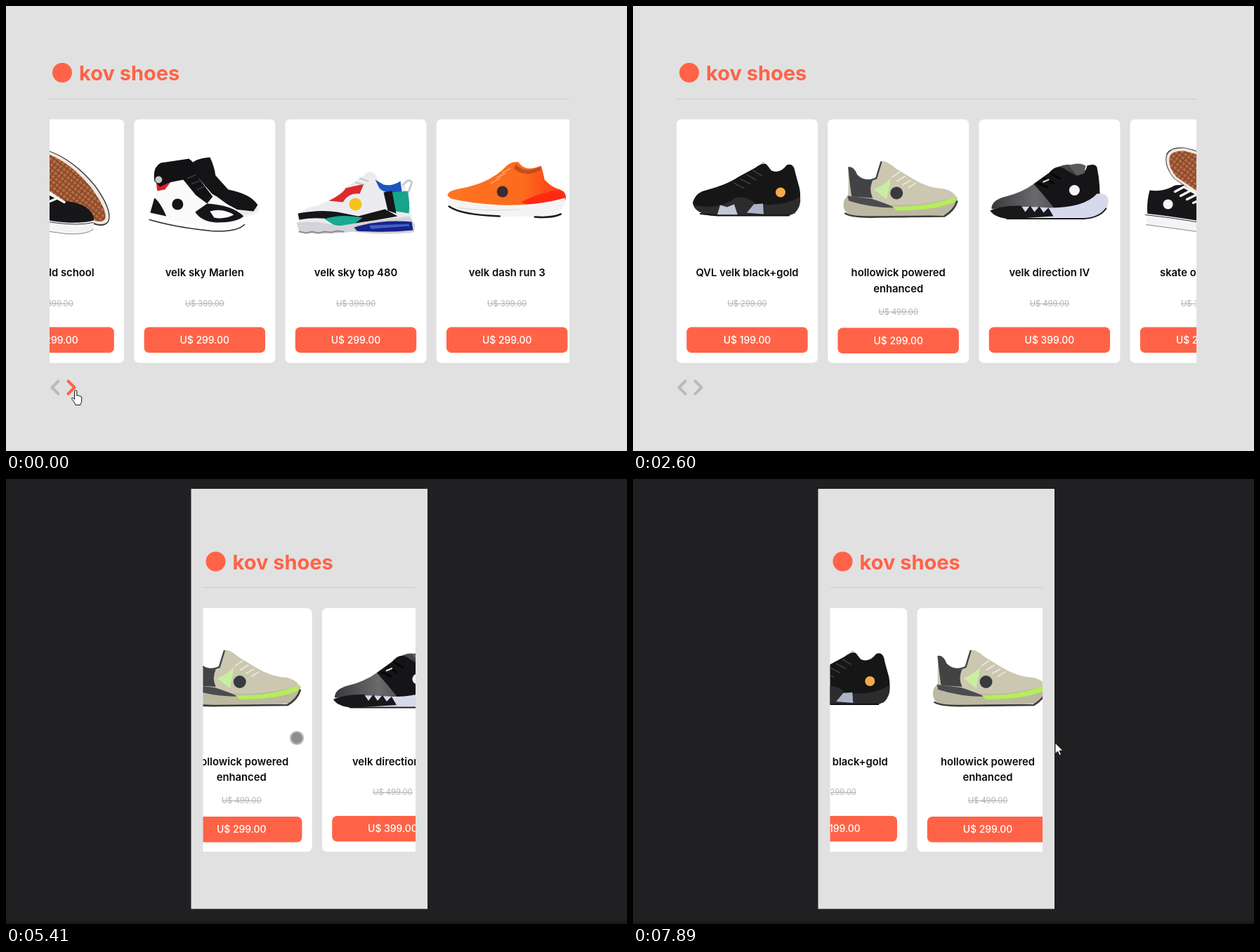
An HTML page that plays this animation: 884 px wide and 634 px high, repeating every 8000 ms.

```html
<!DOCTYPE html>
<html lang="en">
<head>
<meta charset="utf-8">
<title>kov shoes</title>
<style>
  html, body { margin: 0; width: 100%; height: 100%; overflow: hidden; background: #e1e1e1; }
  svg { display: block; width: 100vw; height: 100vh; font-family: Inter, "Open Sans", sans-serif; }
  .brand { font-size: 29px; font-weight: 700; fill: #ff6347; }
  .name { font-size: 14.8px; font-weight: 600; fill: #0b0b0b; text-anchor: middle; }
  .old { font-size: 11.2px; fill: #b4b4b4; text-anchor: middle; text-decoration: line-through; }
  .price { font-size: 13.9px; font-weight: 500; fill: #fff; text-anchor: middle; }
  .nav path { fill: none; stroke-width: 4; stroke-linecap: round; stroke-linejoin: round; }
</style>
</head>
<body>
<svg viewBox="0 0 884 634">
  <defs>
    <clipPath id="view"><rect id="viewBox" x="62" y="155" height="360"/></clipPath>
    <linearGradient id="mesh"><stop offset="0" stop-color="#3a3a3d"/><stop offset=".5" stop-color="#6a6a6d"/><stop offset="1" stop-color="#39393b"/></linearGradient>
    <linearGradient id="flame"><stop offset="0" stop-color="#ff7420"/><stop offset=".65" stop-color="#fb6a1e"/><stop offset="1" stop-color="#ff3214"/></linearGradient>
    <linearGradient id="teal" x2="0" y2="1"><stop offset="0" stop-color="#2a8e9b"/><stop offset="1" stop-color="#37a6b0"/></linearGradient>
    <pattern id="grip" width="6" height="6" patternUnits="userSpaceOnUse" patternTransform="rotate(38)">
      <rect width="6" height="6" fill="#8a4a2a"/><rect x="1" y="1" width="4" height="4" fill="#b56c45"/>
    </pattern>
  </defs>
  <rect width="884" height="634" fill="#e1e1e1"/>
  <g id="phone">
    <rect width="884" height="634" fill="#202022"/>
    <rect y="630" width="884" height="4" fill="#1b171a"/>
    <rect x="263.5" y="14" width="336.5" height="598.5" fill="#e1e1e1"/>
  </g>
  <g id="page">
    <circle cx="80" cy="95" r="14" fill="#ff6347"/>
    <text class="brand" x="104" y="106">kov shoes</text>
    <rect id="rule" x="62" y="131.5" height="1" fill="#cbcbcb" shape-rendering="crispEdges"/>
    <g clip-path="url(#view)"><g id="track"></g></g>
  </g>
  <g id="nav" class="nav">
    <path id="prev" d="M74.5 534.5L65.5 543.5L74.5 552.5"/>
    <path id="next" d="M88.5 534.5L97.5 543.5L88.5 552.5"/>
  </g>
  <path id="hand" fill="#fff" stroke="#111" stroke-linejoin="round"
    d="M4.5 13V2.3a1.7 1.7 0 0 1 3.4 0V8.5c.2-1.3 2.5-1.1 2.5.4c.3-1.1 2.3-.9 2.3.7c.4-.9 2-.5 2 1V15c0 3-1.5 4-1.8 6.5H6C5.6 18.5 1.6 15 .7 12.6c-.4-1.6 1.8-2 3.8.8Z"/>
  <path id="arrow" fill="#fff" stroke="#111" stroke-width=".8" d="M0 0V15.2L3.6 12L6 17.6L8.4 16.5L6 11.1H10.8Z"/>
  <circle id="touch" r="9" fill="#8d8d8d" stroke="#b9b9b9" stroke-width="2.2"/>
</svg>
<script>
const $ = id => document.getElementById(id);
const fill = (c, d) => `<path fill="${c}" d="${d}"/>`;
const line = (c, w, d) => `<path fill="none" stroke="${c}" stroke-width="${w}" stroke-linecap="round" stroke-linejoin="round" d="${d}"/>`;
const dot = (c, x, y, r) => `<circle fill="${c}" cx="${x}" cy="${y}" r="${r}"/>`;

const shoes = {
  gold:
    line('#aaa', 1.2, 'M119 68Q123 57 126 64') +
    fill('#161617', 'M23 119Q27 104 42 101Q72 93 88 82L112 69Q122 61 128 64L135 73Q147 78 157 65Q167 61 169 76L175 98Q179 118 169 132L160 136H48Q26 133 23 119Z') +
    fill('#2c2c2f', 'M24 122Q60 130 84 112Q100 108 112 120Q150 126 176 110Q178 124 168 134L160 137H48Q27 133 24 122Z') +
    fill('#c3c7d6', 'M62 122L72 125L82 121L87 136H58Z') + fill('#aeb4c8', 'M100 133L110 121L123 120L124 135Z') +
    line('#3d3d40', 1.6, 'M82 91l14 7M91 85l14 7M100 79l13 7M109 73l12 7') +
    line('#111', 2, 'M34 134.5L58 137H160') + dot('#f2ab4c', 148, 104, 7),
  lime:
    fill('#ccc7b0', 'M29 68Q37 66 42 79Q53 90 69 82L76 60Q82 57 97 70L120 84Q142 98 166 99Q184 104 184 117L172 132L28 130Q30 96 29 68Z') +
    fill('#414345', 'M29 68Q37 66 42 79Q52 89 64 87Q58 100 64 112L34 110Q31 90 29 68Z') +
    line('#414345', 2.4, 'M42 81Q54 91 69 84L76 61') +
    fill('#c8efa0', 'M66 100Q80 94 90 84L84 114Z') +
    fill('#bdb8a2', 'M29 108Q58 116 84 121Q130 126 184 110Q186 126 168 136L110 140L34 138Q18 130 24 114Z') +
    fill('#4a4c4d', 'M28 109L62 113Q84 120 96 126Q60 126 30 116Z') +
    fill('#b4ee59', 'M92 124Q140 126 183 110L181 118Q150 130 98 130Z') +
    line('#3b3d3d', 2.6, 'M25 134Q34 140 70 139L166 138Q180 130 184 117') +
    line('#ece8d8', 1.8, 'M92 82l10-7M99 88l11-7M107 93l11-6M115 97l10-6') + dot('#383b3e', 98, 105, 9),
  mesh:
    fill('url(#mesh)', 'M18 127Q18 115 38 110Q62 104 78 92L102 76Q116 62 132 65L142 68L140 128L30 136Z') +
    fill('#151517', 'M78 92L100 76Q112 62 124 72L138 80Q152 78 154 66Q165 62 168 68Q172 86 172 104L176 122L110 130L92 108Z') +
    fill('#5c5c5f', 'M128 66Q142 60 152 66L150 77L139 80Z') +
    fill('#d6d9ec', 'M17 128Q60 122 100 126Q150 126 168 106Q186 104 184 120Q180 136 164 140L40 140Q20 138 17 128Z') +
    fill('#18181a', 'M16 130Q34 122 60 123L66 132L73 123L79 132L86 124L92 133L99 126L106 138L44 142Q22 140 16 130Z') +
    line('#18181a', 2, 'M40 141.5H150Q172 140 181 127') +
    line('#050505', 3, 'M84 91l14 6M93 84l13 7M102 77l13 7') + line('#ddd', 2.4, 'M92 89l7-3') + dot('#f4f4f6', 136, 101, 7.5),
  skate:
    fill('#333', 'M51 54Q52 39 76 40Q122 48 160 94Q186 130 179 146Q170 158 146 144L62 84Q49 68 51 54Z') +
    fill('#f1e8e2', 'M52 54Q54 40 77 41Q121 49 159 95Q184 130 178 145Q170 155 148 143L63 84Q50 68 52 54Z') +
    fill('url(#grip)', 'M56 55Q58 44 77 45Q118 53 154 97Q178 130 174 142Q168 150 150 140L66 82Q54 68 56 55Z') +
    fill('#17171a', 'M25 138Q23 118 28 101Q46 104 64 94L76 93Q94 112 122 117Q152 121 158 140L157 152Z') +
    line('#f4f4f4', 3.4, 'M64 103l13-7M72 109l15-8M81 114l16-8M90 119l17-7M78 97l38 21') +
    fill('#f4f4f7', 'M22 134Q60 138 100 145Q136 150 158 144L157 158Q146 165 118 163L24 150Z') +
    line('#35353a', 1, 'M22 136Q60 140 100 147Q136 152 157 147') + line('#88888e', 1, 'M23 150L118 163Q146 165 157 157') +
    dot('#f4f4f4', 54, 121, 7),
  high:
    fill('#e9e9ec', 'M100 100L150 108Q178 118 177 132Q170 140 140 138L110 124Z') +
    fill('#141416', 'M80 66Q84 56 108 54Q114 66 116 80L134 100Q166 106 176 122L170 131L142 128L118 110L92 96Z') +
    line('#f4f4f6', 3, 'M134 139Q164 141 176 131') +
    fill('#fafafb', 'M29 86L31 115L23 130Q20 143 42 147L110 157Q150 159 157 146Q158 134 144 127L116 112L92 84Z') +
    fill('#d51f2a', 'M31 86L53 88L44 100L33 102Z') +
    fill('#121214', 'M29 88Q26 68 38 62L78 56Q92 66 92 84L112 110L104 120L88 108L70 86L50 90L37 96Z') +
    fill('#16161a', 'M104 120Q140 122 156 138Q146 147 118 147Q96 146 87 132Z') +
    fill('#16161a', 'M29 112Q36 116 46 138L23 133Z') + fill('#fbfbfc', 'M108 131Q126 126 142 136Q128 143 114 140Z') +
    line('#fff', 5, 'M24 139Q60 150 110 155Q146 157 156 147') + line('#2a2a2e', 1.6, 'M22 143Q60 154 110 159Q146 161 157 150') +
    line('#3a3a3e', 1.4, 'M76 84l12-5M82 92l13-5M90 100l12-5') + dot('#c8c8cc', 35, 86, 5) + dot('#141416', 62, 121, 8),
  multi:
    line('#c9c9cf', 3, 'M166 96Q176 82 180 90Q178 98 173 108') +
    fill('#ececf0', 'M17 140Q22 126 48 122Q74 112 90 94L112 80Q122 70 128 79L136 92Q152 97 170 94L176 120L182 148L90 156H24Z') +
    fill('#de2a2a', 'M62 116Q82 106 86 98L112 92L106 106Q90 104 82 118Z') +
    fill('#1c55c2', 'M128 86L140 93Q152 96 164 88L166 103Q142 108 134 98Z') +
    fill('#16a58a', 'M150 104L174 102Q178 118 176 134L152 130Z') + fill('#161619', 'M140 104L152 102L158 134L146 130Z') +
    fill('#161619', 'M18 134Q50 128 74 132L104 138L142 128L160 138L132 143L92 150Q56 136 20 143Z') +
    fill('#1aa890', 'M56 142Q78 134 110 140L94 153L70 151Z') +
    fill('#d3d3da', 'M16 147Q50 144 76 152L112 146L176 138L185 150L183 161Q140 166 96 160Q50 166 20 160Z') +
    fill('#17238c', 'M98 154Q136 142 180 146L182 158Q140 162 102 159Z') + fill('#4160c8', 'M120 151L176 149L177 152L122 156Z') +
    line('#8d8d95', 2, 'M20 160l10 2l8-2l9 2l9-2l9 1l9-2l9 1') + line('#bbb', 1.6, 'M100 90l12 3M106 84l12 4') + dot('#f6c21c', 100, 121, 9),
  orange:
    fill('url(#flame)', 'M16 109Q15 102 32 99Q72 92 94 72Q106 58 117 61Q126 76 149 66Q152 76 154 86Q164 97 176 100Q187 106 183 116L150 128L40 128Z') +
    fill('#c64d18', 'M113 64Q126 78 147 68L149 72Q126 84 110 70Z') +
    fill('#ff2a12', 'M120 118Q156 100 180 102Q188 110 181 119L150 128Z') +
    fill('#f4f4f4', 'M16 112Q50 120 90 122Q140 124 183 112Q184 128 168 137L96 139Q40 138 18 125Z') +
    line('#d8d8da', 1.2, 'M30 126Q80 132 120 128') + line('#1c1c1e', 2.6, 'M18 124Q34 136 90 138M140 139Q164 141 177 135') +
    line('#ffa468', 1.8, 'M78 91l12-7M86 83l12-6M94 76l11-6') + dot('#3c2c31', 94, 103, 8),
  aqua:
    fill('url(#teal)', 'M44 96Q58 92 66 78Q74 73 82 78L114 92Q148 98 168 112Q178 118 176 130L120 134L40 124Z') +
    fill('#141517', 'M29 80Q38 74 44 86L50 98Q60 96 66 79Q70 88 68 108L64 124L28 116Q33 96 29 80Z') +
    fill('#c5c8c9', 'M28 108Q44 98 60 104Q62 118 52 128L24 126Z') +
    fill('#f2f2f3', 'M24 122Q40 128 62 120L86 146H38Q22 138 24 122Z') +
    fill('#e4db2e', 'M58 116Q94 132 130 127Q160 126 177 118Q179 132 164 141Q128 147 84 146Q68 140 58 116Z') +
    fill('#17181a', 'M64 116Q100 116 150 127L166 130Q120 140 84 130Z') +
    line('#d4ce3a', 1.6, 'M40 146Q100 150 160 143') + line('#cfd0d1', 1.6, 'M26 138Q34 146 60 146') +
    line('#1d6f7b', 2.2, 'M78 90l14-6M86 95l14-6M95 99l13-6M103 103l12-5') + dot('#a3b5ba', 101, 111, 9)
};

// shoe, old price, price, name lines
const items = [
  ['gold', 299, 199, 'QVL velk black+gold'],
  ['lime', 499, 299, 'hollowick powered', 'enhanced'],
  ['mesh', 499, 399, 'velk direction IV'],
  ['skate', 399, 299, 'skate old school'],
  ['high', 399, 299, 'velk sky Marlen'],
  ['multi', 399, 299, 'velk sky top 480'],
  ['orange', 399, 299, 'velk dash run 3'],
  ['aqua', 399, 299, 'dim harbour tidewell', 'onward']
];
const pitch = 215.2;
$('track').innerHTML = items.map(([shoe, old, price, ...lines], i) => {
  const two = lines.length - 1;
  return `<g transform="translate(${62 + i * pitch} 161.5)">
    <rect width="201" height="347" rx="7" fill="#fff"/>${shoes[shoe]}
    ${lines.map((s, n) => `<text class="name" x="100.5" y="${223.5 + n * 22.5}">${s}</text>`).join('')}
    <text class="old" x="100.5" y="${266.3 + two * 11.7}">U$ ${old}.00</text>
    <rect x="14.3" y="${296 + two}" width="172.4" height="36.5" rx="7" fill="#ff6347"/>
    <text class="price" x="100.5" y="${319.3 + two}">U$ ${price}.00</text></g>`;
}).join('');

const loop = 8000, cut = 3390;
// first change, last change, steps
const spans = [[510, 770, 3], [1140, 1140, 1], [1410, 1800, 4], [1940, 1940, 1], [2210, 2600, 4],
  [3390, 3520, 2], [3670, 4420, 7], [4540, 5140, 6], [5280, 6060, 7], [6190, 6430, 3],
  [6580, 6580, 1], [6730, 6730, 1], [6980, 7760, 7], [7890, 7890, 1]];
const ticks = [0, ...spans.flatMap(([a, b, n]) =>
  Array.from({ length: n }, (_, i) => a + (n > 1 ? (b - a) * i / (n - 1) : 0)))];

// start, duration, from, to
const glides = [[440, 330, 740.5, 967], [1328, 500, 967, 227], [2150, 420, 227, 0]];
const drag = [[5140, 0], [5280, 95], [5410, 261], [5670, 570], [5930, 930], [6190, 1260], [6310, 1370], [6430, 1404.5],
  [6850, 1404.5], [6980, 1330], [7240, 930], [7500, 520], [7630, 340], [7760, 195], [7890, 91.2]];
const handPath = [[500, 93, 547], [640, 72, 546], [770, 57, 545], [1139, 57, 545], [1140, 64, 545]];
const touchPath = [[3670, 815, 142], [3800, 660, 215], [3930, 480, 290], [4060, 340, 365], [4180, 272, 455],
  [4300, 330, 538], [4420, 420, 505], [4540, 485, 460], [4660, 530, 395], [4780, 470, 300], [4900, 365, 330],
  [5020, 450, 395], [5140, 543, 388], [5280, 490, 376], [5410, 414, 369], [5540, 360, 374], [5800, 530, 392],
  [6060, 440, 396], [6310, 384, 404], [6430, 375, 406], [6580, 357.5, 404.5], [6730, 357.5, 403.5],
  [6850, 357.5, 403.5], [7240, 440, 396], [7760, 573, 384], [7890, 601, 376]];

const smooth = u => (u = Math.min(1, Math.max(0, u)), u * u * (3 - 2 * u));
function sample(keys, t) {
  const i = keys.findIndex(k => k[0] > t);
  if (i < 1) return keys[i < 0 ? keys.length - 1 : 0].slice(1);
  const a = keys[i - 1], b = keys[i], u = (t - a[0]) / (b[0] - a[0]);
  return a.slice(1).map((v, n) => v + (b[n + 1] - v) * u);
}
const glide = t => glides.reduce((x, [s, d, a, b]) => t < s ? x : a + (b - a) * smooth((t - s) / d), glides[0][2]);
const show = (id, on) => $(id).setAttribute('visibility', on ? 'visible' : 'hidden');
const move = (id, x, y) => $(id).setAttribute('transform', `translate(${x} ${y})`);

function draw(time) {
  const t = ticks.findLast(k => k <= time);
  const mobile = t >= cut, width = mobile ? 302.5 : 740;
  show('phone', mobile);
  show('nav', !mobile);
  move('page', mobile ? 218.5 : 0, mobile ? 22.5 : 0);
  $('viewBox').setAttribute('width', width);
  $('rule').setAttribute('width', width);
  move('track', -(mobile ? sample(drag, t)[0] : glide(t)), 0);

  const [hx, hy] = sample(handPath, t), pointing = t < 2470;
  show('hand', pointing);
  move('hand', hx, hy);
  const tint = on => pointing && on ? '#ff6347' : '#bababa';
  $('prev').setAttribute('stroke', tint(hx < 77));
  $('next').setAttribute('stroke', tint(hx >= 77));

  const [x, y] = sample(touchPath, t), active = t >= touchPath[0][0], inside = x > 264 && x < 600;
  show('touch', active && inside);
  show('arrow', active && !inside);
  move('touch', x, y);
  move('arrow', x, y);
}

const start = performance.now();
function tick() {
  draw((performance.now() - start) % loop);
  requestAnimationFrame(tick);
}
tick();
</script>
</body>
</html>
```
